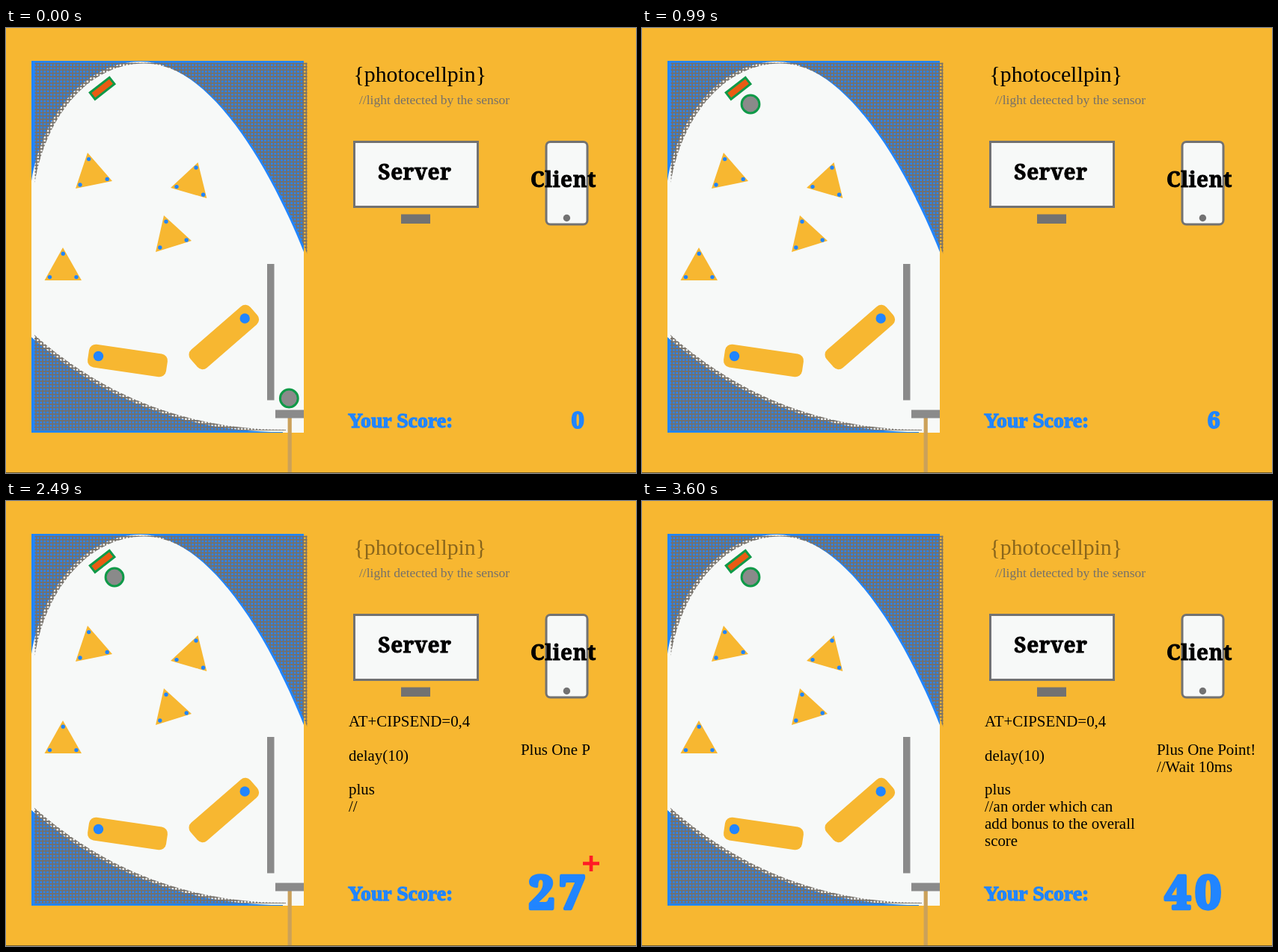
Recreate the animation shown at these times as an HTML page. Size 842 by 596 pixels, loop 5400 ms.

```html
<!DOCTYPE html>
<html lang="en">
<head>
<meta charset="utf-8">
<title>Pinball score</title>
<style>
  html, body { margin: 0; width: 100%; height: 100%; overflow: hidden; background: #f7b731; }
  svg { display: block; width: 842px; height: 596px; }
  text { font-family: "Liberation Serif", "Times New Roman", serif; white-space: pre; }
  .code { font-size: 20.9px; }
  .slab { font: 900 28px "Noto Serif", serif; letter-spacing: .6px; text-anchor: middle;
          stroke: #000; stroke-width: .9; }
  .fat { font-weight: bold; fill: #2185ff; stroke: #2185ff; stroke-linejoin: round; }
  #score { font: 900 30px "Noto Serif", serif; stroke-width: 2; text-anchor: end; }
  #score.big { font-size: 62px; letter-spacing: 6px; stroke-width: 4.4; }
  .device { fill: #f7f9f8; stroke: #727272; stroke-width: 3; }
  .amber { fill: #f7b731; }
  .blue { fill: #2185ff; }
  .grey { fill: #8a8a8a; }
</style>
</head>
<body>
<svg viewBox="0 0 842 596" xmlns="http://www.w3.org/2000/svg">
  <defs>
    <pattern id="grid" width="4.4" height="4.4" patternUnits="userSpaceOnUse">
      <path d="M0 1H4.4M1 0V4.4" stroke="#757069" stroke-width="1.8"/>
    </pattern>
    <path id="arch" d="M34 205C50 110 110 45 180 45C270 45 350 180 398 300V44H34Z"/>
    <path id="slope" d="M34 414C120 490 230 541 370 541V542H34Z"/>
  </defs>

  <rect class="amber" width="842" height="596"/>
  <rect x="34" y="44" width="364" height="498" fill="#f7f9f8"/>
  <use href="#arch" class="blue"/>
  <use href="#slope" class="blue"/>
  <use href="#arch" fill="url(#grid)" x="4.5" y="2.5"/>
  <use href="#slope" fill="url(#grid)" x="4" y="-3"/>

  <g id="bumpers"></g>
  <g transform="translate(162.5 445.5) rotate(8.3)">
    <rect class="amber" x="-53" y="-15.5" width="106" height="31" rx="9"/>
  </g>
  <g transform="translate(291.3 414) rotate(-41)">
    <rect class="amber" x="-53" y="-16" width="106" height="32" rx="9"/>
  </g>
  <circle class="blue" cx="123.5" cy="439.5" r="6.7"/>
  <circle class="blue" cx="319.2" cy="389" r="6.7"/>

  <rect class="grey" x="349" y="316" width="9.5" height="182.5"/>
  <rect x="376.6" y="522" width="5.2" height="74" fill="#cba15a"/>
  <rect class="grey" x="360" y="511.5" width="38" height="11"/>
  <rect x="-16.5" y="-5.5" width="33" height="11" fill="#ea5b13" stroke="#0f9a48"
        stroke-width="3" transform="translate(128.6 80.8) rotate(-38)"/>
  <circle id="ball" class="grey" r="11.9" stroke="#0f9a48" stroke-width="3"/>

  <text id="pin" x="464.5" y="72" font-size="29.8">{photocellpin}</text>
  <text x="472" y="101.5" font-size="17.5" fill="#757069">//light detected by the sensor</text>

  <rect class="device" x="465.5" y="152.5" width="165" height="87"/>
  <rect x="528" y="249.5" width="39" height="12.5" fill="#727272"/>
  <rect class="device" x="722" y="152.5" width="55" height="110.5" rx="5.5"/>
  <circle cx="749.4" cy="254.5" r="4.7" fill="#727272"/>
  <text class="slab" x="546.3" y="203">Server</text>
  <text class="slab" x="744.9" y="213">Client</text>

  <g id="server"></g>
  <g id="client"></g>

  <text class="fat" x="457" y="534.5" font-size="27.8" stroke-width="1.3">Your Score:</text>
  <text id="score" class="fat"></text>
  <path id="plus" d="M771 485.5H793M782 475V496" stroke="#ff1d25" stroke-width="4.6"/>
  <rect y="595" width="842" height="1" fill="#75602c"/>
</svg>
<script>
const NS = 'http://www.w3.org/2000/svg';
const LOOP = 5400, STEP = 30, TYPE_AT = 1800;
const $ = id => document.getElementById(id);

function add(parent, tag, attrs) {
  const el = document.createElementNS(NS, tag);
  for (const key in attrs) el.setAttribute(key, attrs[key]);
  return parent.appendChild(el);
}

// corner points, then the dots inside them
const bumpers = [
  ['109,167 142,205 93,215', [110.7, 175.6], [135.2, 202.4], [99, 210]],
  ['256.5,180 268.3,228 220,214', [254, 187], [263.6, 223.2], [228, 212.6]],
  ['211,251 248,285 200,300', [214, 259.3], [241.2, 284], [205.8, 294]],
  ['76,294 101,338 51.5,338', [76.3, 302.2], [94, 333.6], [58.5, 333.6]]
];
for (const [points, ...dots] of bumpers) {
  add($('bumpers'), 'polygon', { points, class: 'amber' });
  for (const [cx, cy] of dots) add($('bumpers'), 'circle', { cx, cy, r: 2.7, class: 'blue' });
}

function typist(parent, x, rows) {
  const lines = rows.map(([y, text]) => ({ text, el: add(parent, 'text', { x, y, class: 'code' }) }));
  return count => {
    for (const { text, el } of lines) {
      el.textContent = text.slice(0, Math.max(0, count));
      count -= text.length;
    }
  };
}
const typeServer = typist($('server'), 458, [
  [302, 'AT+CIPSEND=0,4'], [347.5, 'delay(10)'], [393, 'plus'],
  [416, '//an order which can '], [439, 'add bonus to the overall '], [462, 'score']
]);
const typeClient = typist($('client'), 688, [[339.5, 'Plus One Point!'], [362.5, '//Wait 10ms']]);

const clamp = v => Math.min(1, Math.max(0, v));
const mix = (a, b, u) => a.map((v, i) => v + (b[i] - v) * u);
function bezier(pts, u) {
  while (pts.length > 1) pts = pts.slice(1).map((p, i) => mix(pts[i], p, u));
  return pts[0];
}
const launch = [[378.3, 496], [392, 282], [320, 173], [263, 122]];
const drop = [[263, 122], [200, 65], [145, 102]];

function scoreAt(t) {
  if (t >= TYPE_AT) return Math.min(40, 10 + Math.floor((t - TYPE_AT) / 38.5));
  if (t < 1170) return Math.min(6, Math.floor(t / 150));
  return Math.min(9, 7 + Math.floor((t - 1170) / 210));
}

function draw(time) {
  const t = Math.floor((time % LOOP) / STEP) * STEP;
  const [x, y] = t < 570 ? bezier(launch, t / 570) : bezier(drop, clamp((t - 570) / 420));
  $('ball').setAttribute('cx', x);
  $('ball').setAttribute('cy', y);

  const fade = clamp(Math.floor((t - 1035) / 75) / 9);
  $('pin').setAttribute('fill-opacity', 1 - 0.56 * fade);

  const k = (t - TYPE_AT) / STEP;
  typeServer(Math.floor(1.325 * k - 0.55 + 2 * clamp((k - 34) / 20)));
  typeClient(Math.floor(0.45 * k - 0.3 + 1e-6));

  const big = t >= TYPE_AT, n = scoreAt(t), score = $('score');
  score.textContent = n;
  score.classList.toggle('big', big);
  score.setAttribute('x', big ? 780 : 772.5);
  score.setAttribute('y', big ? 546 : 536);
  $('plus').style.display = big && n < 40 ? '' : 'none';
}

const start = performance.now();
function tick() {
  draw(performance.now() - start);
  requestAnimationFrame(tick);
}
draw(0);
requestAnimationFrame(tick);
</script>
</body>
</html>
```
